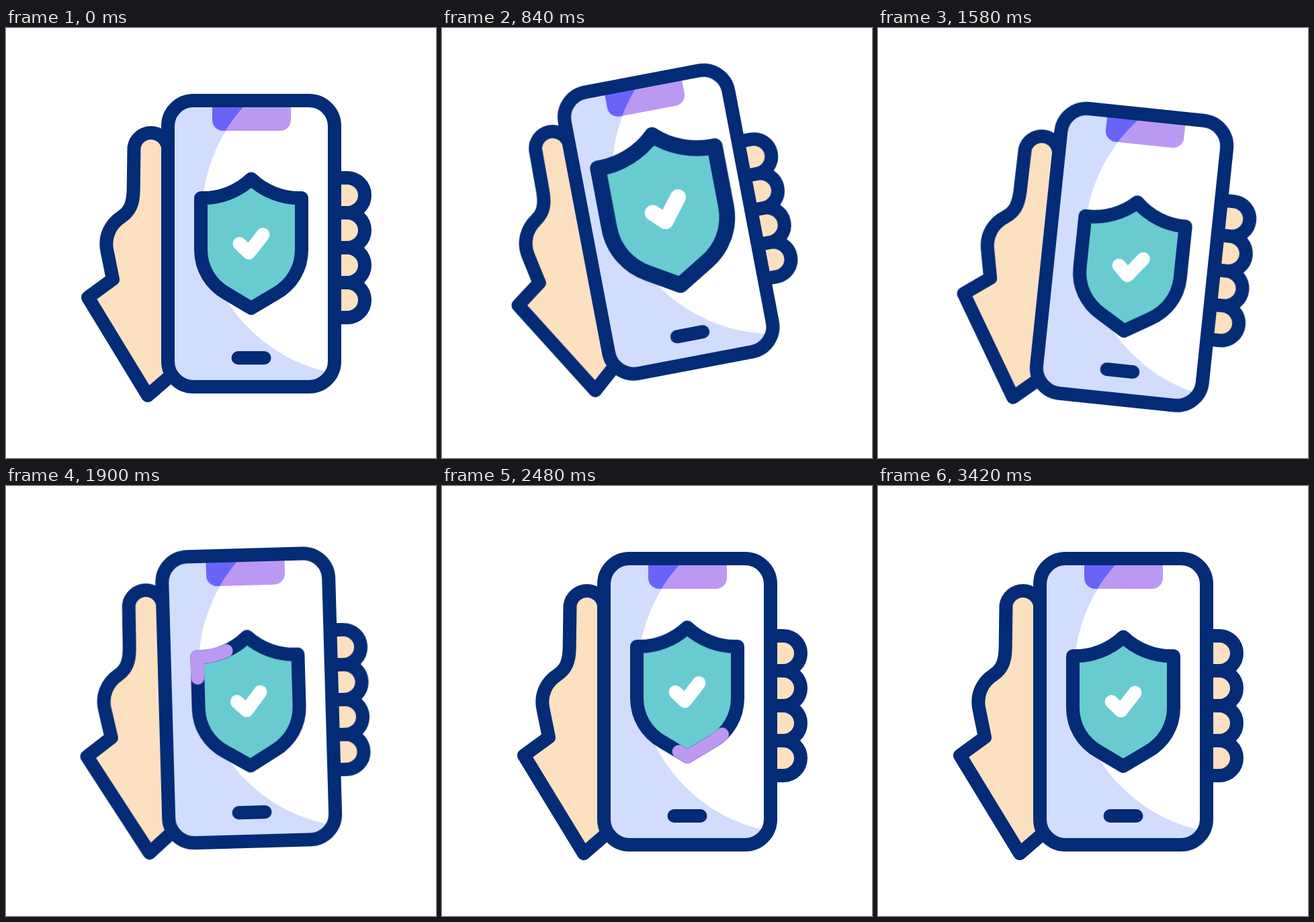
Write an HTML page that moves like this. It is 640 by 640 pixels and loops after 3.62 s.

```html
<!DOCTYPE html>
<html lang="en">
<head>
<meta charset="utf-8">
<title>Secure phone</title>
<style>
  @property --tail { syntax: "<number>"; inherits: false; initial-value: 0; }
  @property --head { syntax: "<number>"; inherits: false; initial-value: 0; }

  :root {
    --navy: #042b76;
    --skin: #fde0c0;
    --lilac: #bb99f2;
    --ease: cubic-bezier(.3333, 0, .6667, 1);
    --loop: 3620ms;
  }
  html, body { margin: 0; width: 100%; height: 100%; overflow: hidden; background: #fff; }
  svg { display: block; width: 100%; height: 100%; }

  .line { stroke: var(--navy); stroke-width: 20; stroke-linecap: round; stroke-linejoin: round; fill: none; }
  .skin { fill: var(--skin); }

  #device { transform-origin: 180px 452px; animation: sway var(--loop) var(--ease) infinite; }
  #lift { animation: lift var(--loop) var(--ease) infinite; }
  #swell { transform-origin: 365px 320px; animation: swell var(--loop) var(--ease) infinite; }
  #trace {
    stroke: var(--lilac);
    stroke-dasharray: calc((var(--head) - var(--tail)) * 1px) 200px;
    stroke-dashoffset: calc(var(--tail) * -1px);
    animation: head var(--loop) linear infinite, tail var(--loop) linear infinite,
               show var(--loop) step-end infinite;
  }

  @keyframes sway {
    0%, 5.525% { transform: rotate(0deg); }
    27.624% { transform: rotate(-12deg); }
    44.199% { transform: rotate(6deg); }
    55.249% { transform: rotate(-3deg); }
    66.298%, 100% { transform: rotate(0deg); }
  }
  @keyframes swell {
    0%, 5.525% { transform: scale(1); }
    27.624% { transform: scale(1.2); }
    44.199%, 100% { transform: scale(1); }
  }
  @keyframes lift {
    0%, 5.525% { transform: translateY(0px); }
    27.624% { transform: translateY(-20px); }
    41.436% { transform: translateY(15px); }
    69.061% { transform: translateY(-14.3px); }
    93.923%, 100% { transform: translateY(0px); }
  }
  @keyframes head {
    0%, 44.613% { --head: 0; }
    83.84%, 100% { --head: 100; }
  }
  @keyframes tail {
    0%, 49.862% { --tail: 0; }
    89.227%, 100% { --tail: 100; }
  }
  @keyframes show {
    0% { opacity: 0; }
    44.613% { opacity: 1; }
    89.227%, 100% { opacity: 0; }
  }
</style>
</head>
<body>
<svg viewBox="0 0 640 640">
  <defs>
    <clipPath id="screen"><rect x="241" y="108" width="248" height="426" rx="38"/></clipPath>
    <clipPath id="glow"><circle cx="531.4" cy="278.2" r="239.6"/></clipPath>
    <path id="finger" d="M489 223H508a26 26 0 0 1 0 52H489"/>
    <path id="notch" d="M307 110H424V137a16 16 0 0 1 -16 16H323a16 16 0 0 1 -16 -16Z"/>
    <path id="shield" pathLength="100" d="M365 224.5C346 243 318 254 290 253V330C290 358 305 382 328 395L365 417L402 395C425 382 440 358 440 330V253C412 254 384 243 365 224.5Z"/>
  </defs>

  <g id="device">
    <path class="line skin" d="M241 178A25.5 25.5 0 0 0 190.5 178L189.7 240C189.5 262 184 273 172 281C155 292 146 311 150.5 332L159 374L122 401L211 547L241 521"/>
    <g class="line skin">
      <use href="#finger"/>
      <use href="#finger" y="52"/>
      <use href="#finger" y="104"/>
      <use href="#finger" y="156"/>
    </g>

    <g clip-path="url(#screen)">
      <rect x="241" y="108" width="248" height="426" fill="#d2dcfd"/>
      <use href="#notch" fill="#6a63f8"/>
      <g clip-path="url(#glow)">
        <rect x="241" y="108" width="248" height="426" fill="#fff"/>
        <use href="#notch" fill="#bb99f2"/>
      </g>
    </g>
    <rect class="line" x="241" y="108" width="248" height="426" rx="38"/>
    <path class="line" d="M345.5 491H384.5"/>

    <g id="lift">
      <g id="swell">
        <use href="#shield" class="line" style="fill:#67cbd0"/>
        <path class="line" style="stroke:#fff" d="M347.5 321L361.5 334.5L382.5 307.5"/>
        <use href="#shield" class="line" id="trace"/>
      </g>
    </g>
  </g>
</svg>
</body>
</html>
```
